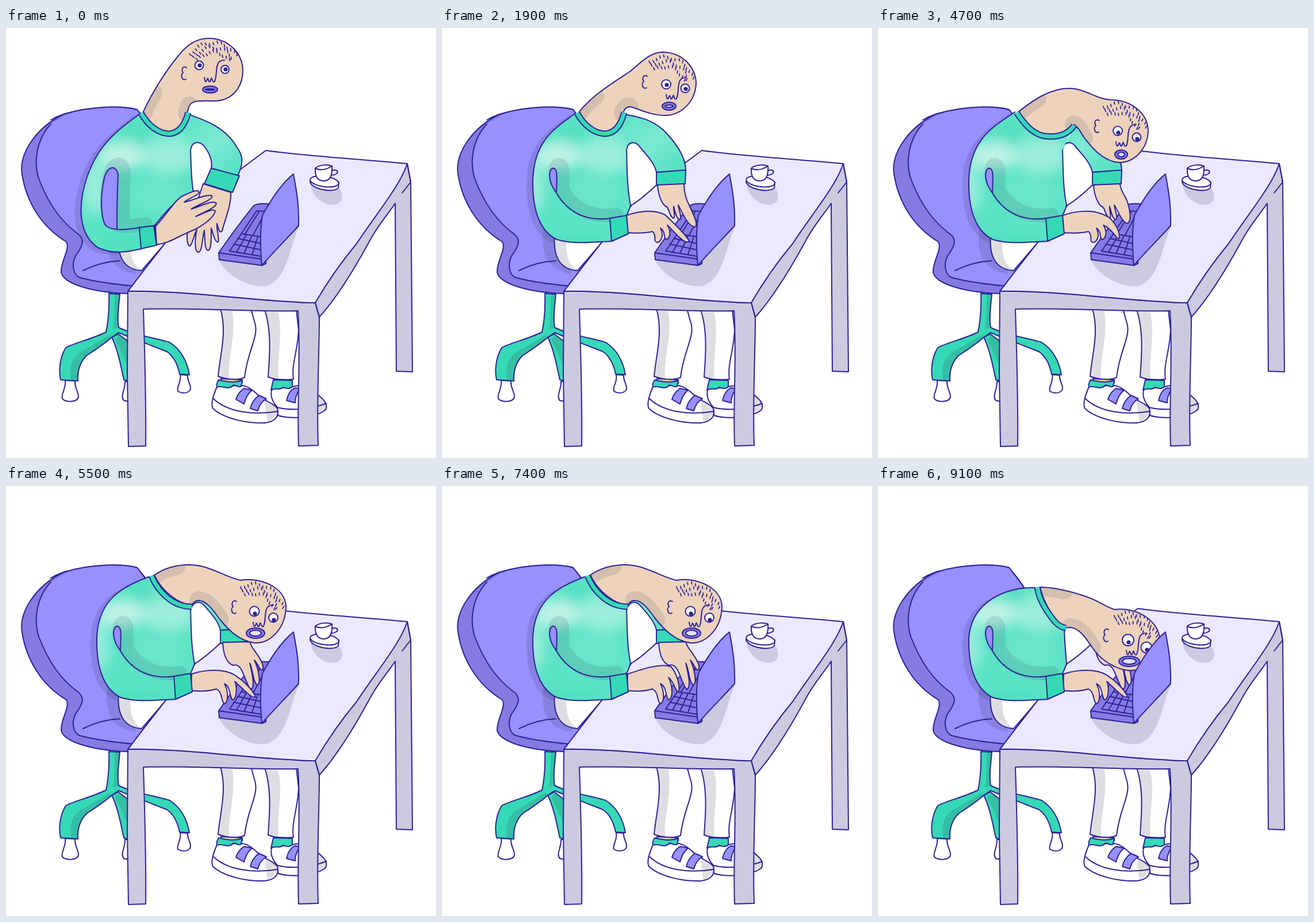
An HTML page that plays this animation: 748 by 748 pixels, repeating every 9.17 s.

```html
<!DOCTYPE html>
<html>
<head>
<meta charset="utf-8">
<style>
html, body { margin: 0; width: 100%; height: 100%; overflow: hidden; background: #fff }
svg { display: block; width: 748px; height: 748px }
.ink { stroke: #2e2296; stroke-width: 2; stroke-linejoin: round; stroke-linecap: round }
.white { fill: #fff } .green { fill: #35d9b5 } .skin { fill: #edd3bb }
.lilac { fill: #9790ff } .violet { fill: #857be3 } .grey { fill: #cccadf }
.line { fill: none } .dim { fill: #34344c; fill-opacity: .16; stroke: none }
.soft { fill: none; stroke: #34344c; stroke-opacity: .13 }
</style>
</head>
<body>
<svg viewBox="0 0 748 748">
<defs>
  <clipPath id="inTorso"><path id="torsoClip"/></clipPath>
  <clipPath id="inNeck"><path id="neckClip"/></clipPath>
  <clipPath id="inChair"><path d="M235 147C205 133 150 135 100 150C50 175 22 220 28 255C35 300 60 345 105 372C112 385 95 405 96 425C100 445 150 460 212 462L260 400V180Z"/></clipPath>
  <filter id="blur" x="-50%" y="-50%" width="200%" height="200%"><feGaussianBlur stdDeviation="11"/></filter>
  <linearGradient id="sleeveTone" gradientUnits="userSpaceOnUse" x1="325" y1="150" x2="405" y2="250">
    <stop stop-color="#5ee3c7"/><stop offset=".5" stop-color="#7ce9d1"/><stop offset="1" stop-color="#55e1c3"/>
  </linearGradient>
</defs>

<g class="ink">
  <!-- chair base -->
  <g class="green">
    <path d="M184 538C195 560 200 590 205 612L216 615V548L195 532Z"/>
    <path d="M179 462C180 490 178 510 174 529C150 541 118 548 104 556C92 575 92 600 95 612L125 614C124 595 130 580 140 570C155 560 172 549 184 538L196 530C220 540 255 553 280 563C290 570 298 582 302 602L319 603C315 580 305 560 285 547C260 539 225 535 196 521C193 505 196 485 198 463Z"/>
  </g>
  <path class="dim" d="M112 600C112 578 122 566 140 558L180 534L184 538L140 570C130 580 124 595 125 614L113 613ZM190 463H198C196 485 193 505 196 520L186 525C190 500 188 480 190 463ZM196 535L216 548V600C208 580 200 560 190 542Z"/>
  <g class="white">
    <path d="M103 613C105 626 95 638 98 645C105 652 124 651 126 642C126 632 119 626 120 614Z"/>
    <path d="M207 615C208 628 198 640 205 648L216 650V615Z"/>
    <path d="M303 603C306 615 296 624 299 632C308 637 320 635 321 627C321 618 315 613 316 604Z"/>
  </g>

  <!-- chair shell -->
  <path class="violet" d="M228 142C205 135 150 135 100 150C50 175 22 220 28 255C35 300 60 345 105 372C112 385 95 405 96 425C100 445 150 460 212 462L260 400L256 180C248 165 238 155 228 142Z"/>
  <path class="lilac" stroke="none" d="M78 167C52 195 48 235 57 262C75 310 100 340 125 358C138 368 133 380 122 395C113 410 117 430 128 434C150 440 190 446 224 449L260 400L255 180C247 165 238 155 228 142C205 136 150 135 110 148Z"/>
  <path class="line" d="M78 167C52 195 48 235 57 262C75 310 100 340 125 358C138 368 133 380 122 395C113 410 117 430 128 434C150 440 190 446 224 449M134 422C150 414 172 406 198 405"/>
  <path class="line" d="M78 160Q88 154 100 150C150 135 205 135 228 142C238 155 247 165 256 180"/>
  <g clip-path="url(#inChair)">
    <path id="bodyShade" class="dim" transform="translate(-11 4)"/>
    <path class="dim" d="M176 350C172 390 180 420 225 428L240 360Z"/>
  </g>
  <path class="white" d="M196 360C193 395 203 420 236 422L285 365Z"/>
  <path class="dim" d="M196 366C193 395 203 420 236 422C220 412 215 395 216 366Z"/>

  <!-- legs and shoes -->
  <g class="white">
    <path d="M450 490C463 530 458 575 456 607C470 613 485 613 500 611C496 585 508 560 509 525L505 490Z"/>
    <path d="M463 627C458 640 465 652 472 660L473 674C500 682 542 676 556 664C562 651 546 641 536 633C522 622 508 620 495 625Z"/>
    <path d="M373 488C385 530 372 570 369 606C385 612 400 614 415 608C420 560 442 535 432 510L426 488Z"/>
    <path d="M367 624C360 640 356 655 360 662C380 680 420 688 450 687C468 685 476 675 472 662C465 651 450 650 440 640C425 625 415 620 400 622Z"/>
  </g>
  <path class="skin" d="M374 610L411 612V617H374ZM466 611L496 612V617H466Z"/>
  <path class="green" d="M370 612C366 618 366 622 367 625C376 620 386 632 396 621C400 622 406 626 409 623L411 613C400 617 384 616 370 612ZM465 612L461 630C470 624 475 632 482 625C487 627 494 628 498 624V613Z"/>
  <path class="lilac" d="M400 646C402 638 407 632 414 627L428 630C419 637 417 645 414 654ZM425 662C427 652 432 645 440 639L453 645C444 650 440 658 438 666ZM488 648C490 637 495 630 502 626L510 627V630C505 637 503 643 503 652Z"/>
  <path class="line" d="M361 645C385 668 430 674 472 667M472 660C500 667 535 662 557 653"/>
  <path class="dim" d="M374 492H393C402 530 385 575 388 611L370 607C373 570 384 530 374 492ZM452 494H473C483 530 470 575 474 612L457 608C459 575 462 530 452 494ZM450 652C468 650 474 665 472 672L455 686ZM533 636C548 640 560 655 555 664L538 670Z"/>

  <!-- table -->
  <g class="grey">
    <path d="M698 236L704 268L707 598L679 597L677 305C660 330 645 345 630 375C600 430 570 475 545 503L530 470Z"/>
    <path d="M212 458L211 600L213 728L243 727C244 640 241 560 239 489C330 486 420 494 508 492C513 570 506 650 509 727L543 726C540 650 545 570 545 503L538 478C430 476 320 456 212 458Z"/>
    <path style="fill:#ebe9ff" d="M212 458C245 415 275 375 330 308C360 290 380 262 405 248L452 213C530 224 620 228 698 236C685 275 645 322 610 375C585 405 560 440 538 478C430 476 320 456 212 458Z"/>
  </g>
  <path class="line" d="M698 236L704 268L689 287M538 478L545 503"/>

  <!-- cup -->
  <path fill="#cccadf" stroke="none" d="M530 274C536 305 570 315 582 302C588 293 582 280 578 276Z"/>
  <path class="white" d="M529 266C528 280 570 288 578 278L579 268Z"/>
  <ellipse class="white" cx="554" cy="267" rx="25" ry="9" transform="rotate(8 554 267)"/>
  <path class="line" d="M567 248C580 244 580 255 567 256"/>
  <path class="white" d="M538 244C537 259 543 266 553 266C564 266 568 256 567 240C558 237 544 238 538 244C548 249 558 246 567 240"/>

  <!-- laptop base -->
  <path fill="#cccadf" stroke="none" d="M370 402C380 428 420 452 452 449C490 438 492 385 510 345L445 395Z"/>
  <path class="violet" d="M370 391C390 362 410 335 430 310Q436 304 458 306L452 410L445 413L371 403Z"/>
  <path class="line" d="M370 391L445 402M389 388L408 360L436 318L449 319M389 388L443 397M396 376L444 386M403 366L444 375M409 358L444 363M401 390L418 360M414 392L428 361M428 394L438 363M416 358L440 320M430 360L446 330"/>
</g>

<!-- person -->
<g class="ink">
  <path id="sleeve" fill="url(#sleeveTone)"/>
  <path id="cuffR" class="green"/>
  <path id="handR" class="skin"/>
  <path id="torso" fill="#5ce3c6" stroke="none"/>
  <g clip-path="url(#inTorso)" stroke="none">
    <g filter="url(#blur)">
      <ellipse cx="285" cy="222" rx="48" ry="30" fill="#9ceedb"/>
      <ellipse cx="200" cy="222" rx="42" ry="24" fill="#bff3e7"/>
      <ellipse cx="290" cy="192" rx="30" ry="12" fill="#84ead3"/>
      <ellipse cx="228" cy="182" rx="26" ry="16" fill="#55dfc1"/>
      <ellipse cx="265" cy="290" rx="50" ry="32" fill="#6ae6ca"/>
      <ellipse cx="155" cy="278" rx="24" ry="46" fill="#98eddb"/>
      <ellipse cx="225" cy="374" rx="70" ry="12" fill="#4cdfbe"/>
    </g>
    <path id="armShade" class="soft" stroke-width="24" transform="translate(10 -6)"/>
  </g>
  <path id="hole" class="lilac" stroke="none"/>
  <path id="armLine" class="line"/>
  <path id="side" class="line"/>
  <path id="neck" class="skin"/>
  <g clip-path="url(#inNeck)">
    <path id="neckShade" class="soft" stroke-width="32" stroke-dasharray="42 999"/>
    <path id="chinShade" class="soft" stroke-width="32"/>
  </g>
  <path id="collarInk" class="line" style="stroke-width:11;stroke-linecap:butt"/>
  <path id="collar" class="line" style="stroke:#35d9b5;stroke-width:7;stroke-linecap:butt"/>

  <path id="hair" class="line" style="stroke-width:1.8"/>
  <path id="ear" class="line" d="M5-10C-1-14-5-7-1-1C-6 2-3 14 4 10"/>
  <circle id="eyeL" class="white"/><circle id="eyeR" class="white"/>
  <circle id="pupilL" r="2.6" fill="#2e2296"/><circle id="pupilR" r="2.6" fill="#2e2296"/>
  <path id="nose" class="line" d="M-9-2C-8 7-6 7-4 1C-2-4-2 8 1 5C3 1 3-5 5 3Q8 9 10 2C14-10 8-33 26-32"/>
  <ellipse id="lips" class="violet"/><ellipse id="gap" fill="#e5e1ff"/>

  <path class="lilac" d="M445 413C442 380 442 350 446 326C460 300 480 270 500 254C506 285 510 310 509 344C490 365 465 390 445 413Z"/>
  <path id="handL" class="skin"/>
  <path id="cuffL" class="green"/>
</g>
</svg>

<script>
const $ = id => document.getElementById(id);
const set = (id, attrs) => { for (const k in attrs) $(id).setAttribute(k, attrs[k]); };
const NUM = /-?\d+(\.\d+)?/g;

// Blend the numbers of two strings of the same structure; otherwise switch halfway.
function mix(a, b, u) {
  const n = b.match(NUM);
  if (a.match(NUM).length !== n.length) return u < .5 ? a : b;
  let i = 0;
  return a.replace(NUM, v => (+v + (n[i++] - v) * u).toFixed(2));
}

const arm = 'C157 320 172 355 200 368C230 377 265 372 295 371L322 358L321 326C323 322 326 316 328 308';
const flank = 'C322 280 322 245 321 212';

const rest = {
  side: 'M234 148C205 172 150 200 133 290C126 330 134 365 160 382C185 394 210 390 236 384L260 361L258 344C275 325 290 300 326 285C322 265 322 240 321 212',
  tail: 'L317 148C308 178 300 186 282 186C262 184 245 168 234 148Z',
  neck: 'M237 150C250 120 275 78 300 48C314 30 332 18 352 18C388 18 412 45 412 75C411 107 390 127 362 127C345 127 325 124 319 135C317 140 316 145 315 148C308 172 300 180 282 180C265 179 245 165 237 150Z',
  collar: 'M235 148C246 168 264 183 282 184C300 184 311 170 317 147',
  sleeve: 'M317 150C345 160 382 172 402 208C415 225 411 240 403 257L357 244C360 228 352 215 345 206C338 197 324 195 321 212',
  cuffR: 'M357 244L406 257L394 286L345 271Z',
  cuffL: 'M232 347L257 344L262 378L235 384Z',
  hole: 'M193 349C193 310 194 275 195 255C191 236 175 240 170 265C162 305 167 338 175 345',
  arm: 'C190 354 215 350 233 347',
  face: '336 65 381 72 354 88 355 107 13 6 8 1 309 79 360 73 -20 0 7.5'
};
const type = {
  ...rest,
  side: 'M232 148C205 170 160 190 158 265' + arm + flank,
  neck: 'M237 148C258 120 290 100 325 77C345 62 360 42 385 42C420 43 442 70 442 97C440 130 415 152 388 152C360 152 338 138 326 137C318 138 317 143 315 148C308 172 300 180 282 180C265 179 245 165 237 148Z',
  sleeve: 'M317 150C345 155 372 160 395 188C412 208 423 225 424 248L373 251C370 235 355 220 345 208C338 197 324 195 321 212',
  cuffR: 'M373 251L424 247L423 271L373 274Z',
  cuffL: 'M292 331L321 326L324 358L295 371Z',
  hole: 'M199 287C199 275 201 260 199 250C196 240 187 242 187 258C188 272 194 279 199 287',
  arm: 'C215 315 245 338 293 331',
  face: '390 98 423 105 399 118 395 136 12 7 7 2 352 94 389 98 0 1 8'
};
const bend = {
  ...type,
  neck: 'M237 148C258 120 295 78 322 77C345 78 360 97 392 98C430 98 456 122 456 154C455 185 432 208 404 207C375 205 352 172 342 158C333 145 322 136 315 148C308 172 300 180 282 180C265 179 245 165 237 148Z',
  face: '403 153 435 165 409 174 407 194 11 8 6 4 366 146 403 153 5 3 8'
};
const lower = {
  ...bend,
  side: 'M238 146C205 170 160 190 158 265' + arm + flank,
  tail: 'L341 168C335 185 310 193 290 190C270 185 252 170 238 146Z',
  neck: 'M243 147C270 125 300 105 332 105C360 105 380 124 405 125C440 125 470 148 470 180C468 212 445 234 420 234C390 232 370 205 358 190C352 180 348 172 341 168C330 182 308 188 290 185C270 180 255 168 243 147Z',
  collar: 'M241 147C255 168 270 185 290 188C312 191 330 185 341 170',
  sleeve: 'M341 172C355 175 375 180 395 195C412 208 423 225 424 248L373 251C370 235 355 220 345 208C338 197 324 195 321 212',
  face: '417 179 450 190 423 200 423 220 11 8 6 4 380 171 417 179 5 3 8'
};
const deep = {
  ...lower,
  side: 'M248 158C205 175 160 195 158 265' + arm + flank,
  tail: 'L323 212C318 213 305 212 292 204C272 195 258 178 248 158Z',
  neck: 'M258 155C275 143 295 137 320 137C355 138 380 158 408 164C440 158 486 175 487 210C486 248 460 274 433 273C405 270 385 248 372 232C360 215 348 199 335 199C328 200 325 203 323 208C300 204 272 185 258 155Z',
  collar: 'M253 156C262 178 278 196 298 205C308 209 316 210 323 210',
  sleeve: 'M325 195C350 195 385 200 400 215C420 230 424 240 424 248L373 251C370 235 355 220 345 208C338 200 328 200 322 212',
  face: '432 218 465 229 439 239 434 256 16 9 10 5 396 211 433 218 5 4 8.5'
};
const stuck = {
  ...deep,
  side: 'M273 177C225 175 162 200 158 265' + arm + 'C326 290 325 270 324 250',
  tail: 'L326 247C315 245 300 230 290 215C280 200 275 190 273 177Z',
  neck: 'M282 176C305 176 330 182 355 190C380 197 395 210 412 215C450 210 490 235 490 268C488 305 460 322 438 321C410 319 385 300 372 280C360 262 350 248 335 246C332 246 329 246 326 247C310 238 288 205 282 176Z',
  collar: 'M277 176C280 195 290 213 300 226C308 238 318 246 327 247',
  sleeve: 'M330 200C355 210 380 215 400 230C415 240 425 255 425 265L385 270C370 260 360 250 350 245C345 240 335 235 326 240',
  cuffR: 'M385 270L425 265L425 290L392 290Z',
  face: '435 268 467 281 441 288 437 305 18 9 12 5 396 260 436 268 5 4 10'
};

// Hands: resting, then [key pressed, key released] for each typing style.
const restHands = {
  L: 'M260 345C280 325 295 295 312 290C325 284 335 280 336 286C334 292 318 296 310 303C325 300 350 288 358 292C362 298 335 307 322 315C340 310 360 298 366 305C366 312 345 320 330 328C345 322 362 312 364 319C360 332 340 345 325 352C300 362 285 374 262 377Z',
  R: 'M343 271L320 340C312 360 315 380 320 379C325 375 325 365 332 350C328 370 328 390 335 390C342 388 341 365 345 352C346 370 346 388 352 387C358 384 357 360 357 348C360 358 364 374 369 372C372 368 366 352 367 340C370 352 372 358 376 353C380 335 392 310 391 286Z'
};
const curlL = 'C400 355 396 366 390 368C384 364 390 355 380 348C386 360 382 372 374 373C366 370 375 362 366 354C350 358 335 357 322 356Z';
const curlR = 'M375 273C376 290 382 308 392 312C396 320 398 330 403 331C407 328 402 318 403 310C405 318 408 334 414 333C418 329 412 318 411 308';
const longL = 'C402 348 402 370 394 372C388 366 392 350 380 344C386 355 388 375 380 379C373 374 378 360 366 353C350 358 335 357 322 356Z';
const longR = 'M377 272C378 295 385 308 395 312C412 305 416 345 426 354C434 350 428 325 424 308C430 320 430 345 438 346C444 340 438 315 432 303C438 308 441 322 446 320C451 314 440 297 435 290C430 284 426 278 424 271Z';
const poke = [
  { L: 'M321 326C345 318 370 316 388 325C402 338 420 355 430 370C424 380 405 355 392 343' + curlL,
    R: curlR + 'C420 325 428 345 440 346C447 342 436 322 430 308C424 297 421 285 421 271Z' },
  { L: 'M321 326C345 318 370 316 388 323C408 328 420 350 420 365C416 372 410 350 392 343' + curlL,
    R: curlR + 'C418 318 424 338 434 340C442 336 438 315 434 303C430 290 422 285 421 271Z' }
];
const spread = [
  { L: 'M323 327C350 318 380 318 398 329C412 338 430 355 434 367C426 370 410 350 398 340' + longL, R: longR },
  { L: 'M323 327C350 318 380 308 398 314C408 325 414 345 412 358C406 360 404 340 394 333' + longL, R: longR }
];

const keys = [[0, rest], [400, rest], [900, type], [2200, type], [3000, bend], [4200, bend],
  [4700, lower], [5200, deep], [8200, deep], [8900, stuck], [9170, stuck]];

// Short stubble in arcs over the skull.
let stubble = '';
[47, 39, 31].forEach((r, row) => {
  const n = 15 - row * 2;
  for (let i = 0; i < n; i++) {
    const a = (-125 + 112 * i / (n - 1)) * Math.PI / 180, q = r + 2.5 * Math.sin(i * 5 + row);
    const lean = -2 + 4 * i / n;
    stubble += `M${q * Math.cos(a)} ${q * Math.sin(a) + 2}l${lean} -4`;
  }
});
$('hair').setAttribute('d', stubble);

function draw(ms) {
  const k = Math.floor(ms / 100), t = k * 100;
  let i = 0;
  while (i < keys.length - 2 && keys[i + 1][0] <= t) i++;
  const [t0, a] = keys[i], [t1, b] = keys[i + 1], u = (t - t0) / (t1 - t0);
  const at = name => mix(a[name], b[name], u);

  const side = at('side'), torso = side + at('tail'), neck = at('neck'), hole = at('hole');
  for (const id of ['torso', 'torsoClip', 'bodyShade']) set(id, { d: torso });
  for (const id of ['neck', 'neckClip']) set(id, { d: neck });
  set('side', { d: side });
  const bends = neck.split('C');
  set('neckShade', { d: bends[0] + 'C' + bends[1] });
  set('chinShade', { d: 'M' + bends[5].match(NUM).slice(-2).join(' ') + 'C' + bends[6] });
  set('hole', { d: hole });
  for (const id of ['armLine', 'armShade']) set(id, { d: hole + at('arm') });
  for (const id of ['collar', 'collarInk']) set(id, { d: at('collar') });
  for (const id of ['sleeve', 'cuffL', 'cuffR']) set(id, { d: at(id) });

  const hands = t < 700 ? restHands : (t < 5000 ? poke : spread)[k % 3 === 1 ? 0 : 1];
  set('handL', { d: hands.L });
  set('handR', { d: hands.R });

  const [lx, ly, rx, ry, nx, ny, mx, my, mw, mh, gw, gh, ex, ey, hx, hy, turn, look, r] = at('face').split(' ').map(Number);
  set('eyeL', { cx: lx, cy: ly, r });
  set('eyeR', { cx: rx, cy: ry, r: r - .5 });
  set('pupilL', { cx: lx + 1, cy: ly + look });
  set('pupilR', { cx: rx + 1, cy: ry + look });
  set('nose', { transform: `translate(${nx} ${ny})` });
  set('ear', { transform: `translate(${ex} ${ey})` });
  set('hair', { transform: `translate(${hx} ${hy}) rotate(${turn})` });
  set('lips', { cx: mx, cy: my, rx: mw, ry: mh });
  set('gap', { cx: mx, cy: my, rx: gw, ry: gh });
}

const start = performance.now();
function tick() {
  draw((performance.now() - start) % 9170);
  requestAnimationFrame(tick);
}
tick();
</script>
</body>
</html>
```
